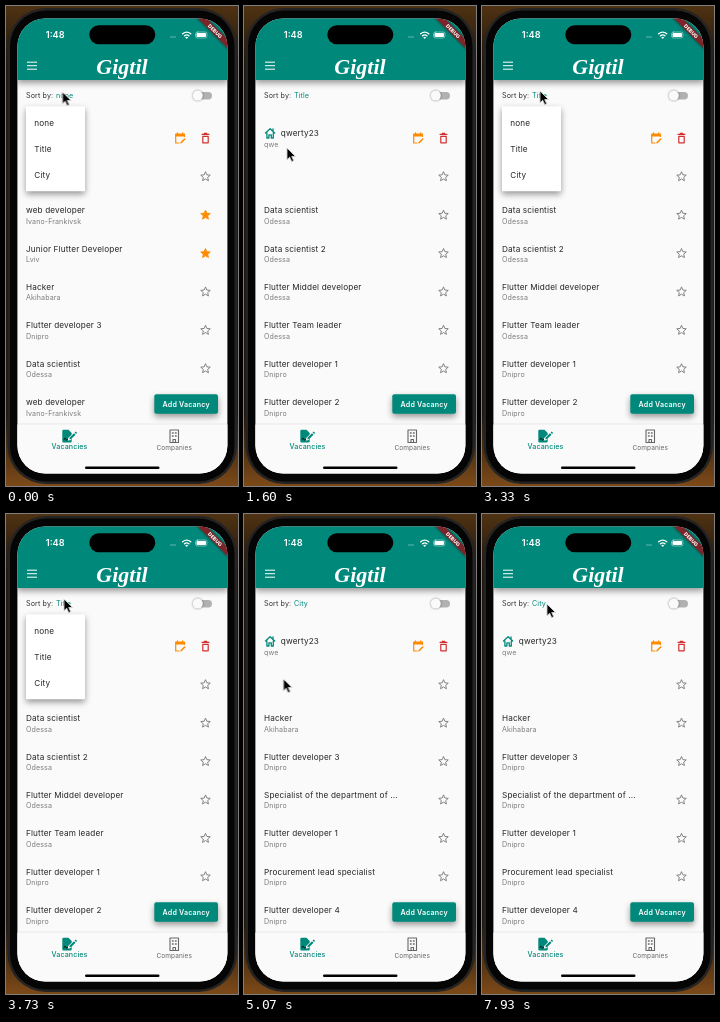
Animation, 232 px wide and 480 px high, one loop 8000 ms. Source, as an HTML page:

```html
<!DOCTYPE html>
<html lang="en">
<head>
<meta charset="utf-8">
<title>Vacancy list sorting</title>
<style>
  html, body { margin: 0; width: 100%; height: 100%; overflow: hidden; background: #1c140d; }
  svg { display: block; width: 100vw; height: 100vh; font-family: Inter, Roboto, sans-serif; --teal: #00897b; }
  .teal { fill: var(--teal); }
  .line { fill: none; stroke: currentColor; stroke-linecap: round; stroke-linejoin: round; }
  .title { font-size: 8.2px; letter-spacing: .14px; fill: #262626; }
  .place { font-size: 7.1px; letter-spacing: .1px; fill: #7b7b7b; }
  .small { font-size: 7.2px; letter-spacing: .1px; }
  .middle { text-anchor: middle; }
  .shadow { filter: drop-shadow(0 3px 3px #0006); }

  .timed { animation: 8s infinite step-end; }
  #byNone { animation-name: first; }
  #byTitle { animation-name: second; }
  #byCity { animation-name: third; }
  #listNone { animation-name: first; }
  #listTitle { animation-name: secondList; }
  #listCity { animation-name: thirdList; }
  #loader { animation-name: loading; }
  @keyframes first { 0% { opacity: 1 } 9.2%, 100% { opacity: 0 } }
  @keyframes second { 0% { opacity: 0 } 9.2% { opacity: 1 } 60.8%, 100% { opacity: 0 } }
  @keyframes third { 0% { opacity: 0 } 60.8%, 100% { opacity: 1 } }
  @keyframes secondList { 0% { opacity: 0 } 12.5% { opacity: 1 } 60.8%, 100% { opacity: 0 } }
  @keyframes thirdList { 0% { opacity: 0 } 62.9%, 100% { opacity: 1 } }
  @keyframes loading {
    0% { opacity: 0 } 9.2% { opacity: 1 } 12.5% { opacity: 0 }
    60.8% { opacity: 1 } 62.9%, 100% { opacity: 0 }
  }

  #loader rect { transform-box: fill-box; transform-origin: center; animation: pulse 1s infinite ease-in-out; }
  @keyframes pulse { 0%, 100% { transform: scaleY(1) } 50% { transform: scaleY(.4) } }

  #menu { animation: menu 8s infinite linear; }
  @keyframes menu {
    0%, 10.6% { opacity: 1 } 13.3%, 36.8% { opacity: 0 }
    39.6%, 60.6% { opacity: 1 } 63.1%, 100% { opacity: 0 }
  }
  #hover { animation-name: hover; }
  @keyframes hover {
    0% { opacity: 0; transform: translateY(0) }
    3.1% { opacity: 1; transform: translateY(0) }
    4.9% { opacity: 1; transform: translateY(25.7px) }
    13.4% { opacity: 0; transform: translateY(0) }
    50.5% { opacity: 1; transform: translateY(0) }
    52.4% { opacity: 1; transform: translateY(25.7px) }
    54.3% { opacity: 1; transform: translateY(51.4px) }
    63.2%, 100% { opacity: 0; transform: translateY(51.4px) }
  }
  #ripple { transform: scale(0); animation: ripple 8s infinite linear; }
  @keyframes ripple {
    0%, 58.4% { transform: scale(.1); opacity: 0 }
    58.8% { transform: scale(.4); opacity: 1 }
    61% { transform: scale(1.6); opacity: 1 }
    63%, 100% { transform: scale(2); opacity: 0 }
  }

  #cursor { animation: move 8s infinite ease-in-out; }
  @keyframes move {
    0%, .6% { transform: translate(56.5px, 86px) }
    6.6%, 18.8% { transform: translate(42.7px, 143px) }
    31.2%, 33% { transform: translate(57.5px, 85px) }
    34.2%, 47.6% { transform: translate(58px, 85px) }
    56.3%, 77.2% { transform: translate(39.5px, 165px) }
    83.4%, 87% { transform: translate(192px, 359px) }
    95%, 97.6% { transform: translate(68.5px, 91px) }
    99%, 100% { transform: translate(65px, 90px) }
  }
</style>
</head>
<body>
<svg viewBox="0 0 232 480" preserveAspectRatio="none">
  <defs>
    <linearGradient id="wall" x2="0" y2="1">
      <stop stop-color="#4f3212"/><stop offset=".12" stop-color="#20170e"/>
      <stop offset=".85" stop-color="#20170e"/><stop offset="1" stop-color="#7d4a18"/>
    </linearGradient>
    <clipPath id="screen"><rect x="11.4" y="12.4" width="210" height="455.200" rx="28"/></clipPath>
    <clipPath id="cityRow"><rect x="20" y="155.500" width="59" height="25.700"/></clipPath>
  </defs>

  <rect width="232" height="480" fill="url(#wall)"/>
  <rect x="1.500" y="2" width="229.500" height="476" rx="38" fill="#262422"/>
  <rect x="4" y="4.500" width="224.500" height="471" rx="35.500" fill="#050505"/>

  <g clip-path="url(#screen)">
    <rect x="11" y="10" width="211" height="458" fill="#fafafa"/>

    <g id="listNone" class="timed"></g>
    <g id="listTitle" class="timed"></g>
    <g id="listCity" class="timed"></g>
    <g id="loader" class="timed teal"></g>

    <g class="small">
      <text x="20" y="92.300" fill="#333">Sort by:</text>
      <g class="teal">
        <text id="byNone" class="timed" x="50" y="92.300">none</text>
        <text id="byTitle" class="timed" x="50" y="92.300">Title</text>
        <text id="byCity" class="timed" x="50" y="92.300">City</text>
      </g>
    </g>
    <rect x="189" y="86" width="17" height="7.400" rx="3.700" fill="#b1b1b1"/>
    <circle cx="191.800" cy="89.600" r="5" fill="#fafafa" style="filter:drop-shadow(0 .7px .8px #0007)"/>

    <!-- bottom bar -->
    <rect x="11" y="418.500" width="211" height="50" fill="#fafafa" style="filter:drop-shadow(0 -.5px .6px #0001)"/>
    <g class="teal">
      <path d="M57.500 423.800h5l3.200 3.200v1.500l-3.500 3.500-.5 2.500 2.500-.3 1.500-1.500v2.500q0 1.200-1.200 1.200h-7q-1.200 0-1.200-1.200v-10.200q0-1.200 1.200-1.200z"/>
      <path d="M63.300 433.300l.4-1.800 4.300-4.300 1.500 1.500-4.300 4.300zM68.600 426.600l1-1 1.500 1.500-1 1z"/>
      <path class="line" stroke="#fafafa" stroke-width=".8" d="M58 433.500q1.300-3 1.800-.5t2 .5"/>
      <text class="middle" x="63.500" y="443.400" font-size="7.100" letter-spacing=".1" font-weight="500">Vacancies</text>
    </g>
    <g color="#666">
      <path class="line" d="M164 424h8.500v12.500h-8.500zM167 436.500v-3h2.500v3" stroke-width="1.100"/>
      <path class="line" d="M166.400 427h.8M169.400 427h.8M166.400 430h.8M169.400 430h.8" stroke-width="1.300"/>
      <text class="middle" x="168.200" y="443.500" font-size="6.500" letter-spacing=".1" fill="#666">Companies</text>
    </g>
    <rect x="79" y="460.500" width="74.500" height="2.600" rx="1.300"/>

    <g class="shadow">
      <rect class="teal" x="148.300" y="388.300" width="63.700" height="19.500" rx="2"/>
    </g>
    <text class="middle" x="180.200" y="400.700" font-size="7.100" letter-spacing=".18" font-weight="600" fill="#fff">Add Vacancy</text>

    <!-- header -->
    <rect class="teal shadow" x="11" y="10" width="211" height="64"/>
    <path d="M21 56.200h10M21 59.700h10M21 63.200h10" stroke="#fff" stroke-width="1"/>
    <text class="middle" x="116" y="67.500" fill="#fff" font-family="'Liberation Serif', serif" font-size="22" font-weight="700" font-style="italic">Gigtil</text>
    <text class="middle" x="49.200" y="32.300" fill="#fff" font-size="9.200" font-weight="600">1:48</text>
    <rect x="83.300" y="19.200" width="66" height="19" rx="9.500"/>
    <g color="#fff">
      <path class="line" d="M165 31h6" stroke-width="1.300" stroke-dasharray="0 2" opacity=".55"/>
      <path class="line" d="M176.700 27.800q4-3.300 8 0M178.500 29.800q2.200-1.800 4.400 0" stroke-width="1.400"/>
      <path d="M179.200 31.300q1.500-1.200 3 0l-1.500 1.600z" fill="#fff"/>
      <rect class="line" x="189.500" y="26" width="11.500" height="6" rx="2" stroke-width=".7" opacity=".6"/>
      <rect x="190.500" y="27" width="9.500" height="4" rx="1" fill="#fff"/>
    </g>
    <g transform="translate(209 25.200) rotate(45)">
      <rect x="-30" y="-3.200" width="60" height="6.400" fill="#7c2429" style="filter:drop-shadow(0 0 1.500px #0008)"/>
      <text class="middle" y="1.800" font-size="5" font-weight="800" fill="#fff">DEBUG</text>
    </g>

    <g id="menu">
      <rect class="shadow" x="20" y="100.200" width="59" height="85" rx="1" fill="#fff"/>
      <rect id="hover" class="timed" x="20" y="104.300" width="59" height="25.700" fill="#f4f4f4"/>
      <g clip-path="url(#cityRow)"><g transform="translate(39 166)"><circle id="ripple" r="19" fill="#0001"/></g></g>
      <g class="title">
        <text x="28.300" y="120.400">none</text>
        <text x="28.300" y="146">Title</text>
        <text x="28.300" y="171.600">City</text>
      </g>
    </g>
  </g>

  <path id="cursor" d="M0 0v11.700l2.700-2.500 2 4.400 2-.9-2-4.200h3.800z" fill="#000" stroke="#fff" stroke-width=".7" style="filter:drop-shadow(0 .7px .6px #0006)"/>
</svg>
<script>
  const byId = id => document.getElementById(id);
  const rowPitch = 38.4;

  function star(y, filled) {
    const points = Array.from({ length: 10 }, (_, i) => {
      const r = i % 2 ? 2.3 : 5, a = Math.PI * (i / 5 - .5);
      return `${199.5 + r * Math.cos(a)},${y + .3 + r * Math.sin(a)}`;
    }).join(' ');
    const color = filled ? '#ff8c00' : '#777';
    return `<polygon points="${points}" fill="${filled ? color : 'none'}" stroke="${color}" stroke-width=".9" stroke-linejoin="round"/>`;
  }

  const ownVacancy = `
    <path class="line" style="color:var(--teal)" stroke-width="1.3" d="M21.500 127l4.600-4.200 4.600 4.200M22.900 127v5h2v-3.200h2.400v3.200h2v-5M29 122.800v2"/>
    <text class="title" x="36.800" y="130">qwerty23</text>
    <text class="place" x="20" y="140.700">qwe</text>
    <g color="#ff8c00">
      <path class="line" stroke-width="1.200" d="M173 137h-3.300v-9h8.800v2.500M171.500 126.800v1.500M176.700 126.800v1.500"/>
      <path d="M169.500 128h9v2.500h-9z" fill="currentColor"/>
      <path class="line" stroke-width="1.600" d="M175 136.700l3.700-3.700"/>
    </g>
    <path class="line" color="#d32f2f" stroke-width="1.200" d="M196 128.300h7M198.300 127.300h2.400M196.800 130.300v6.500h5.400v-6.500z"/>`;

  function fillList(id, rows) {
    const items = rows.map(([title, place, starred], i) => {
      const y = rowPitch * (i + 2);
      return `<text class="title" x="20" y="${130.3 + y}">${title}</text>
        <text class="place" x="20" y="${140.7 + y}">${place}</text>${star(132 + y, starred)}`;
    });
    byId(id).innerHTML = ownVacancy + star(132 + rowPitch) + items.join('');
  }

  fillList('listNone', [
    ['web developer', 'Ivano-Frankivsk', true],
    ['Junior Flutter Developer', 'Lviv', true],
    ['Hacker', 'Akihabara'],
    ['Flutter developer 3', 'Dnipro'],
    ['Data scientist', 'Odessa'],
    ['web developer', 'Ivano-Frankivsk']
  ]);
  fillList('listTitle', [
    ['Data scientist', 'Odessa'],
    ['Data scientist 2', 'Odessa'],
    ['Flutter Middel developer', 'Odessa'],
    ['Flutter Team leader', 'Odessa'],
    ['Flutter developer 1', 'Dnipro'],
    ['Flutter developer 2', 'Dnipro']
  ]);
  fillList('listCity', [
    ['Hacker', 'Akihabara'],
    ['Flutter developer 3', 'Dnipro'],
    ['Specialist of the department of ...', 'Dnipro'],
    ['Flutter developer 1', 'Dnipro'],
    ['Procurement lead specialist', 'Dnipro'],
    ['Flutter developer 4', 'Dnipro']
  ]);

  byId('loader').innerHTML = Array.from({ length: 5 }, (_, i) =>
    `<rect x="${99.2 + i * 7.1}" y="253" width="4.8" height="26.4" style="animation-delay:${i * 110 - 1200}ms"/>`).join('');
</script>
</body>
</html>
```
